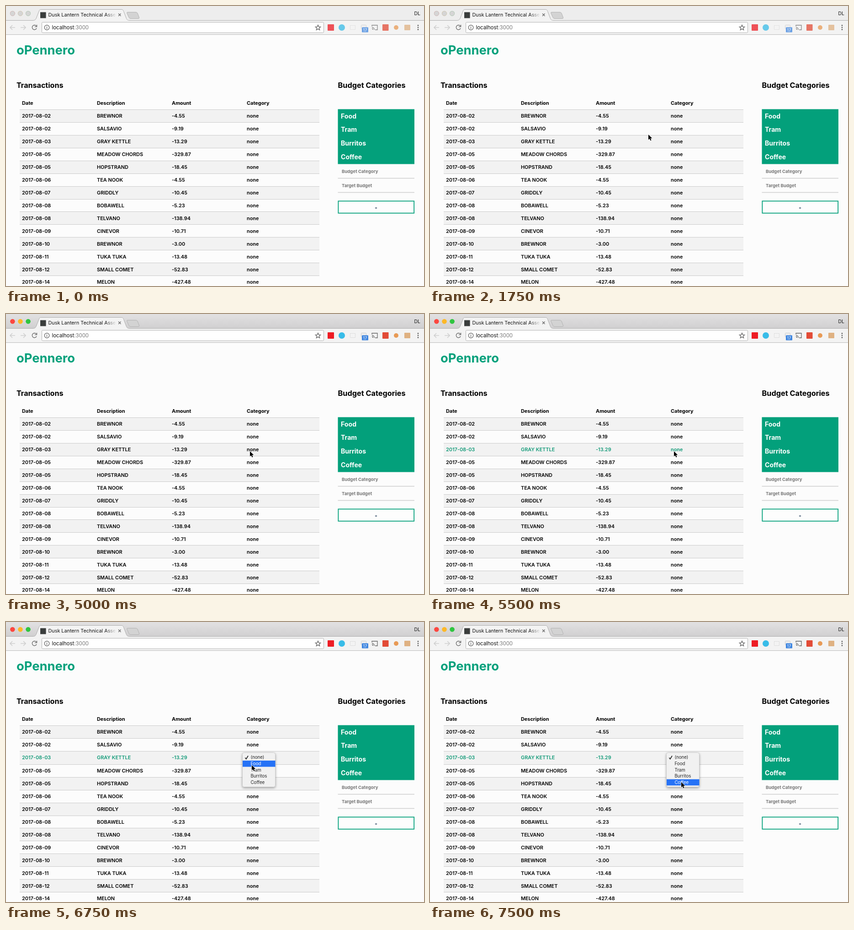
Write an HTML page that moves like this. It is 915 px wide and 612 px high and loops after 8 s.

```html
<!DOCTYPE html>
<html lang="en">
<head>
<meta charset="utf-8">
<title>Budget table</title>
<style>
  html, body { margin: 0; width: 100%; height: 100%; overflow: hidden; background: #fcfcfc; }
  svg { display: block; width: 915px; height: 612px; font-family: Inter, "Open Sans", sans-serif; }
  :root { --accent: #03a07b; }

  .bold { font-weight: 700; }
  .accent { fill: var(--accent); }
  #rows text { font-size: 10.9px; font-weight: 600; }
  .thin { fill: none; stroke: #666; stroke-width: 1.3; }
  .faint { stroke: #cfcfcf; stroke-width: 1.6; }

  /* Every change is a hard cut on one shared 8 s clock. */
  .strip, .lights, .ext, .picked, .chosen-none, .shift, .select, .menu, .hit, .cursor {
    animation: 8s step-end infinite;
  }
  .strip { animation-name: strip; }
  .lights { animation-name: hide-on-focus; }
  .ext { animation-name: ext; }
  .picked { animation-name: picked; }
  .chosen-none { animation-name: hide-on-edit; }
  .shift { animation-name: shift; }
  .select { animation-name: show-on-edit; }
  .menu { animation-name: menu; }
  .hit { visibility: hidden; }
  .hit0 { animation-name: hit0; }
  .hit1 { animation-name: hit1; }
  .hit3 { animation-name: hit3; }
  .hit4 { animation-name: hit4; }
  .cursor { animation-name: cursor; }

  @keyframes strip { 0% { fill: #ededed; } 62.5%, 100% { fill: url(#focused); } }
  @keyframes hide-on-focus { 0% { visibility: visible; } 62.5%, 100% { visibility: hidden; } }
  @keyframes ext { 0% { opacity: .75; } 62.5%, 100% { opacity: 1; } }
  @keyframes picked { 0% { fill: #000; } 68.75%, 100% { fill: #129a78; } }
  @keyframes hide-on-edit { 0% { visibility: visible; } 71.875%, 100% { visibility: hidden; } }
  @keyframes show-on-edit { 0% { visibility: hidden; } 71.875%, 100% { visibility: visible; } }
  @keyframes shift { 0% { transform: none; } 71.875%, 100% { transform: translateY(1px); } }
  @keyframes menu { 0% { opacity: 0; } 78.125%, 100% { opacity: 1; } }
  @keyframes hit0 { 0%, 84.375%, 100% { visibility: hidden; } 78.125% { visibility: visible; } }
  @keyframes hit1 { 0%, 87.5%, 100% { visibility: hidden; } 84.375% { visibility: visible; } }
  @keyframes hit3 { 0%, 90.625%, 100% { visibility: hidden; } 87.5% { visibility: visible; } }
  @keyframes hit4 { 0% { visibility: hidden; } 90.625%, 100% { visibility: visible; } }
  @keyframes cursor {
    0% { transform: translate(-40px, -40px); }
    12.5% { transform: translate(387px, 193px); }
    15.625% { transform: translate(343px, 218px); }
    21.875% { transform: translate(478px, 281px); }
    25% { transform: translate(481px, 282px); }
    31.25% { transform: translate(506px, 286px); }
    34.375% { transform: translate(531px, 298px); }
    37.5% { transform: translate(534px, 299px); }
    40.625% { transform: translate(534px, 300px); }
    81.25% { transform: translate(537px, 309px); }
    84.375% { transform: translate(538px, 313px); }
    87.5% { transform: translate(546px, 342px); }
    90.625%, 100% { transform: translate(550px, 350px); }
  }
</style>
</head>
<body>
<svg viewBox="0 0 915 612">
  <defs>
    <linearGradient id="focused" x2="0" y2="1">
      <stop stop-color="#e2e1e2"/><stop offset="1" stop-color="#d0cfd0"/>
    </linearGradient>
    <linearGradient id="fade" gradientUnits="userSpaceOnUse" x1="218" x2="241" y1="0" y2="0">
      <stop stop-color="#111"/><stop offset="1" stop-color="#111" stop-opacity="0"/>
    </linearGradient>
    <filter id="shadow" x="-20%" y="-20%" width="140%" height="140%">
      <feDropShadow dx="0" dy="2" stdDeviation="2.5" flood-opacity=".35"/>
    </filter>
  </defs>
  <rect width="915" height="612" fill="#fcfcfc"/>

  <!-- window frame -->
  <rect class="strip" width="915" height="32"/>
  <rect y="31" width="915" height="31" fill="#f3f3f3"/>
  <path d="M0 31.5H59C64 31.5 65 29 66.500 26L72 11.500C73.500 8 74.500 7.500 77 7.500H252C255 7.500 256 8 257.500 11.500L263 26C264.500 30 266 31.500 270 31.500H915" fill="#f3f3f3" stroke="#adadad"/>
  <path d="M266 13.500H284Q287 13.500 288 16L291.500 25Q292 27.500 290 27.500H273Q270 27.500 269 25L265 16Q264 13.500 266 13.500Z" fill="#d3d3d3" stroke="#b3b3b3"/>
  <path d="M0 62.500H915" stroke="#bababa"/>
  <g>
    <circle cx="14.300" cy="16.300" r="5.300" fill="#fc4740"/>
    <circle cx="31.400" cy="16.300" r="5.300" fill="#fdb827"/>
    <circle cx="48.500" cy="16.300" r="5.300" fill="#2fc540"/>
  </g>
  <g class="lights" fill="#d5d5d5" stroke="#c5c5c5" stroke-width=".8">
    <circle cx="14.300" cy="16.300" r="5.100"/><circle cx="31.400" cy="16.300" r="5.100"/><circle cx="48.500" cy="16.300" r="5.100"/>
  </g>
  <rect x="75" y="13.500" width="12.500" height="13" fill="#3a3d3c"/>
  <text x="92.500" y="23" font-size="10.800" fill="url(#fade)">Dusk Lantern Technical Asses</text>
  <path class="thin" d="M246 16.500l5.500 5.500m0-5.500l-5.500 5.500"/>
  <text x="893.500" y="20" font-size="10.500" fill="#111">DL</text>

  <!-- toolbar -->
  <path class="thin faint" d="M20 47H9m5-5l-5 5 5 5M32 47H43m-5-5l5 5-5 5"/>
  <path class="thin" d="M66.500 44A5 5 0 1 0 67 48.500M67.500 41V45.300H63"/>
  <rect x="78.500" y="35.500" width="617" height="23" rx="2" fill="#fff" stroke="#b2b2b2"/>
  <circle class="thin" cx="89.500" cy="47" r="5.300"/>
  <path class="thin" d="M89.500 46V50M89.500 43.500V44.900"/>
  <text x="100.500" y="51" font-size="11.400" fill="#111">localhost<tspan fill="#777">:3000</tspan></text>
  <path class="thin" d="M683 41.500l1.600 3.800 4.100.3-3.100 2.700 1 4-3.600-2.200-3.600 2.200 1-4-3.100-2.700 4.100-.3Z"/>
  <g class="ext">
    <rect x="704" y="40" width="14" height="14" rx="1" fill="#ed1c24"/>
    <circle cx="735" cy="47" r="7" fill="#38bce8"/>
    <rect x="753.500" y="42.500" width="11" height="9" fill="none" stroke="#d2d2d2" stroke-dasharray="2 1"/>
    <rect x="777.500" y="41.500" width="11" height="9" rx="1" fill="#eee" stroke="#ccc"/>
    <rect x="779" y="46.500" width="14" height="11" rx="1" fill="#3f86e0"/>
    <text x="786" y="55.500" font-size="9" fill="#fff" text-anchor="middle">17</text>
    <path class="thin" d="M801 44.500V42H813V52H808M801 46.500A5.500 5.500 0 0 1 806.500 52M801 49.500A2.500 2.500 0 0 1 803.500 52"/>
    <rect x="824" y="40" width="13.500" height="14" rx="1" fill="#e24b36"/>
    <circle cx="854" cy="47" r="5" fill="#e89a55"/>
    <rect x="872" y="41" width="13" height="12" rx="1" fill="#dfb182"/>
  </g>
  <g fill="#666"><circle cx="902" cy="42.500" r="1.400"/><circle cx="902" cy="47" r="1.400"/><circle cx="902" cy="51.500" r="1.400"/></g>

  <!-- page -->
  <text class="bold accent" x="23" y="106" font-size="27.300">oPennero</text>
  <g class="bold" font-size="16.300">
    <text x="23" y="179" font-size="16.100">Transactions</text>
    <text x="726.500" y="179">Budget Categories</text>
  </g>
  <g class="bold" font-size="10.900">
    <text x="35" y="216">Date</text>
    <text x="199" y="216">Description</text>
    <text x="363" y="216">Amount</text>
    <text x="527" y="216">Category</text>
  </g>
  <g id="rows"></g>
  <g class="select">
    <rect x="528" y="289" width="54" height="15" rx="3.500" fill="#f8f8f8" stroke="#777a90" stroke-width="1.700"/>
    <path d="M573 295.500l2.300-3.300 2.300 3.300zm0 2l2.300 3.300 2.300-3.300z" fill="#555"/>
  </g>

  <!-- sidebar -->
  <rect class="accent" x="726.500" y="225.500" width="167.500" height="120"/>
  <g id="budgets" class="bold" font-size="14.100" fill="#fff"></g>
  <g class="bold" font-size="9.600" fill="#777">
    <text x="735" y="365">Budget Category</text>
    <text x="735" y="395.500">Target Budget</text>
  </g>
  <path d="M726.500 376.500H894M726.500 407.500H894" stroke="#cdcdcd" stroke-width="1.700"/>
  <rect x="727.400" y="426.400" width="165.800" height="26.300" fill="#fdfdfd" stroke="#03a07b" stroke-width="1.800"/>
  <text x="810" y="444" font-size="9" font-weight="600" fill="#334a66" text-anchor="middle">+</text>

  <g class="menu">
    <rect x="517.500" y="285.500" width="72" height="75" rx="4" fill="#f1f1f1" stroke="#c4c4c4" stroke-width=".8" filter="url(#shadow)"/>
    <g id="options" font-size="9.700"></g>
  </g>
  <path class="cursor" d="M0 0V11.500L2.700 9 4.500 13.300 6.500 12.500 4.700 8.300H8.300Z" fill="#000" stroke="#fff" stroke-width="1.400" paint-order="stroke"/>
</svg>
<script>
  const transactions = `02 BREWNOR -4.55
02 SALSAVIO -9.19
03 GRAY KETTLE -13.29
05 MEADOW CHORDS -329.87
05 HOPSTRAND -18.45
06 TEA NOOK -4.55
07 GRIDDLY -10.45
08 BOBAWELL -5.23
08 TELVANO -138.94
09 CINEVOR -10.71
10 BREWNOR -3.00
11 TUKA TUKA -13.48
12 SMALL COMET -52.83
14 MELON -427.48`.split('\n');
  const budgets = ['Food', 'Tram', 'Burritos', 'Coffee'];
  const PICKED = 2;

  const fill = (id, items, draw) => {
    document.getElementById(id).innerHTML = items.map(draw).join('');
  };
  const text = (x, y, label, attrs = '') => `<text x="${x}" y="${y}" ${attrs}>${label}</text>`;

  fill('rows', transactions, (line, i) => {
    const [, day, shop, amount] = line.match(/^(\d+) (.+) (\S+)$/);
    const top = Math.round(226 + 27.93 * i);
    const base = Math.round(244.4 + 27.93 * i);
    const state = i === PICKED ? 'picked' : i > PICKED ? 'shift' : '';
    return `<g class="${state}">
      <rect x="30" y="${top}" width="656" height="30" fill="${i % 2 ? '#fcfcfc' : '#f2f2f2'}"/>
      <rect x="30" y="${top}" width="656" height="1" fill="#cbcbcb"/>
      ${text(35, base, '2017-08-' + day)}${text(199, base, shop)}${text(363, base, amount)}
      ${text(527, base, 'none', i === PICKED ? 'class="chosen-none"' : '')}</g>`;
  });

  fill('budgets', budgets, (name, i) => text(733, 245.5 + 29.9 * i, name));

  fill('options', ['(none)', ...budgets], (name, i) => {
    const y = 289.3 + 13.6 * i;
    const label = color => text(535.5, y + 10, name, `fill="${color}"`) + (i ? '' :
      `<path d="M523.5 296.500l2.200 3 4.300-7" fill="none" stroke="${color}" stroke-width="1.600"/>`);
    return label('#222') + `<g class="hit hit${i}">
      <rect x="518" y="${y}" width="71.500" height="13.600" fill="#2672f6"/>${label('#fff')}</g>`;
  });
</script>
</body>
</html>
```
